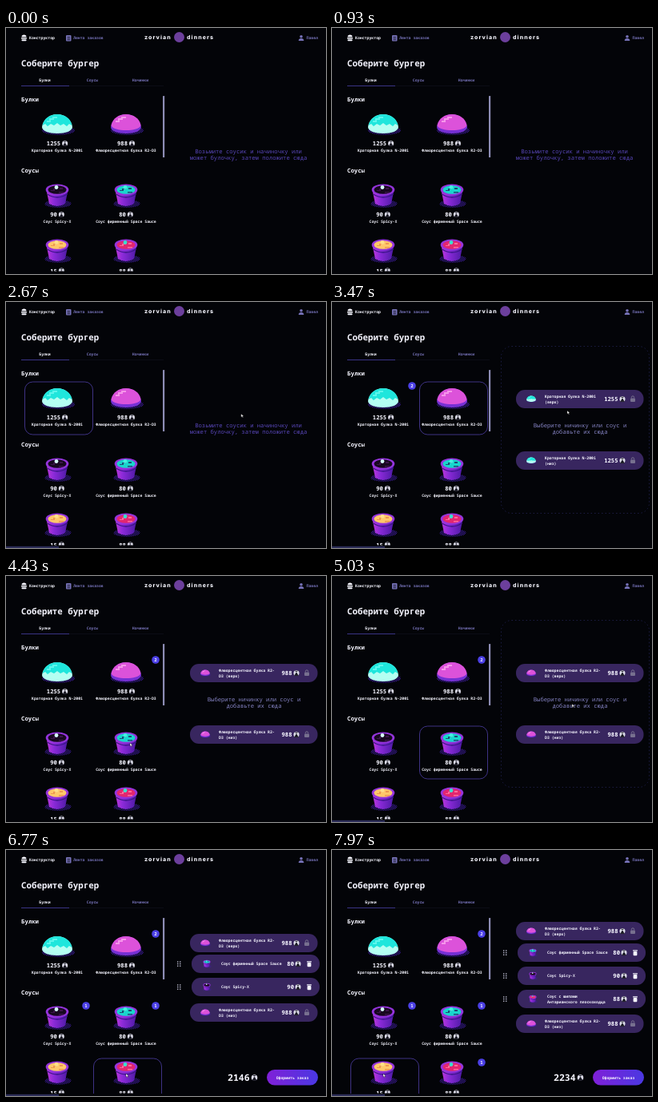
Write an HTML page that moves like this. It is 400 by 308 pixels and loops after 8000 ms.

```html
<!DOCTYPE html>
<html lang="ru">
<head>
<meta charset="utf-8">
<title>Конструктор бургеров</title>
<style>
  html, body { margin: 0; width: 100%; height: 100%; overflow: hidden; background: #030408; }
  svg { display: block; width: 100vw; height: 100vh; }
  text { font-family: "Noto Sans Mono", "DejaVu Sans Mono", monospace; text-rendering: geometricPrecision; white-space: pre; }
  .brand { font: 800 7px Inter, sans-serif; letter-spacing: 1.1px; fill: #f0f0f8; }
  .timed { opacity: 0; animation: 8s step-end infinite; }
  #cursor { animation: move 8s ease-in-out infinite; }
</style>
</head>
<body>
<svg id="stage" viewBox="0 0 400 308">
  <defs>
    <pattern id="dither" width="2" height="2" patternUnits="userSpaceOnUse">
      <path d="M0 0h1v1h1v1h-1v-1h-1z" fill="#3b1c96"/>
    </pattern>
    <linearGradient id="order"><stop stop-color="#8020d8"/><stop offset="1" stop-color="#4a38e2"/></linearGradient>
    <linearGradient id="pot"><stop stop-color="#c038dc"/><stop offset=".35" stop-color="#8a2ad8"/><stop offset="1" stop-color="#4c1aa4"/></linearGradient>
    <clipPath id="list"><rect width="200" height="304.5"/></clipPath>
  </defs>
</svg>
<script>
const LOOP = 8000;
const WHITE = '#f6f6ff', DIM = '#7672b8', PURPLE = '#4f3fa4', PANEL = '#38265f';
const S = 4.85, M = 7.2, ADVANCE = 0.6;
const rules = [];

const text = (x, y, str, { size = S, fill = WHITE, anchor = 'start', weight = 600 } = {}) =>
  `<text x="${x}" y="${y + size * 0.35}" font-size="${size}" fill="${fill}" text-anchor="${anchor}" font-weight="${weight}">${str}</text>`;
const rect = (x, y, w, h, r, attrs) => `<rect x="${x}" y="${y}" width="${w}" height="${h}" rx="${r}" ${attrs}/>`;
const at = (x, y, body, scale = 1) => `<g transform="translate(${x} ${y}) scale(${scale})">${body}</g>`;
const pct = ms => (ms / LOOP * 100).toFixed(3) + '%';

// Shows the content only inside the given [from, to] spans of the loop.
function during(spans, body) {
  const name = 'show' + rules.length;
  const steps = spans.map(([from, to]) => `${pct(from)}{opacity:1}${pct(to)}{opacity:0}`).join('');
  rules.push(`@keyframes ${name}{0%{opacity:0}${steps}}`);
  return `<g class="timed" style="animation-name:${name}">${body}</g>`;
}

const coin = (x, y, r = 3.5) => at(x, y,
  '<circle r="1" fill="#dcdce8"/><path d="M0-.2L.65 .9H-.65ZM-.5-.8L0-.5 .5-.8" fill="#15151f" stroke="#15151f" stroke-width=".2"/>', r);

function bun({ base, top, lightest, lower }) {
  return `<ellipse cx="1.5" cy="7" rx="20.5" ry="6" fill="url(#dither)"/>
    <path d="M-19 3C-18-6-10-13 0-13S18-6 19 3C19 8 10 11 0 11S-19 8-19 3Z" fill="${base}"/>
    <path d="M-18.5 1C-16.5-8-9-13 0-13S17-8 18.5 1${lower}Z" fill="${top}"/>
    <path d="M-13-5h3v-3h4v-2h6v2h-4v2h-4v3h-5z" fill="${lightest}"/>`;
}
const mintBun = bun({ base: '#b4fff2', top: '#1fe6dc', lightest: '#5cf6ec', lower: 'L15-1 12 2 8-1 4 1 0-2-4 1-8-1-12 2-15-1' });
const pinkBun = bun({ base: '#7630d4', top: '#dc52da', lightest: '#f596ea', lower: 'C17 5 9 7 0 7S-17 5-18.5 1' });

function pot(sauce, spot, dot) {
  return `<ellipse cx="1" cy="10" rx="16.5" ry="5" fill="url(#dither)"/>
    <path d="M-13.5-7L-10 10Q0 16 10 10L13.5-7Z" fill="url(#pot)"/>
    <path d="M-12.5-2Q0 6 12.5-2" fill="none" stroke="#3a1488" stroke-width="1.4"/>
    <ellipse cy="-7.5" rx="14.3" ry="7" fill="#9434dc"/>
    <ellipse cy="-7.5" rx="11.5" ry="5.3" fill="${sauce}"/>
    <path d="M-8-7h3v-2h5v1h-3v2h-5zM2-5h6v1.5h-6zM3-10h4v2h-4z" fill="${spot}"/>
    <circle cx="-1" cy="-10.5" r="2.4" fill="${dot}"/>`;
}
const spicyPot = pot('#17081f', '#3a1448', '#d5fff8');
const spacePot = pot('#18d6cc', '#1d4c78', '#46f0e0');
const yellowPot = pot('#ffc86a', '#ee9850', '#ffe08a');
const pinkPot = pot('#e3266f', '#ff6a9a', '#38e0d0');

function price(cx, y, value) {
  const width = value.length * M * ADVANCE, left = cx - (width + 9) / 2;
  return text(left, y, value, { size: M }) + coin(left + width + 5.5, y);
}
const card = (x, y, art, value, name) =>
  at(x, y, art) + price(x, y + 23.5, value) + text(x, y + 32.5, name, { anchor: 'middle' });
const outline = (x, y) => rect(x - 40.5, y - 21, 85, 66, 10, `fill="none" stroke="${PURPLE}" stroke-width=".8"`);
const badge = (x, y, n) =>
  `<circle cx="${x}" cy="${y}" r="4.8" fill="#4c40e6"/>` + text(x, y, n, { size: 5.6, anchor: 'middle', weight: 700 });

const lines = (x, y, rows) =>
  rows.map((row, i) => text(x, y + (i - (rows.length - 1) / 2) * 7, row)).join('');
const lock = (x, y) =>
  `<path d="M${x - 1.7} ${y - 1}v-1a1.7 1.7 0 0 1 3.4 0v1" fill="none" stroke="#77708f"/>` + rect(x - 3, y - 1, 6, 4.5, 1, 'fill="#77708f"');
const trash = (x, y) =>
  rect(x - 2.4, y - 1.6, 4.8, 5.4, 1, `fill="${WHITE}"`) + rect(x - 3, y - 3.2, 6, 1.2, .5, `fill="${WHITE}"`);
const grip = y => [-2.6, 0, 2.6].map(d => rect(214, y + d - .7, 1.5, 1.5, .4, 'fill="#b8b8cc"') +
  rect(217, y + d - .7, 1.5, 1.5, .4, 'fill="#b8b8cc"')).join('');

const bunRow = (y, { art, rows, cost }, side) =>
  rect(230, y - 11.5, 159.5, 23, 11, `fill="${PANEL}"`) + at(249, y, art, .31) +
  lines(266, y, [rows[0], `${rows[1]}(${side})`]) +
  text(357.5, y, cost, { size: M, anchor: 'end' }) + coin(363, y) + lock(376, y);
const itemRow = (y, { art, rows, cost }) =>
  grip(y) + rect(232, y - 11.5, 160, 23, 11, `fill="${PANEL}"`) + at(251, y, art, .32) +
  lines(269, y, rows) + text(360, y, cost, { size: M, anchor: 'end' }) + coin(365, y) + trash(379, y);

const mint = { art: mintBun, rows: ['Краторная булка N-200i', ''], cost: '1255' };
const pink = { art: pinkBun, rows: ['Флюоресцентная булка R2-', 'D3 '], cost: '988' };
const space = { art: spacePot, rows: ['Соус фирменный Space Sauce'], cost: '80' };
const spicy = { art: spicyPot, rows: ['Соус Spicy-X'], cost: '90' };
const spikes = { art: pinkPot, rows: ['Соус с шипами', 'Антарианского плоскоходца'], cost: '88' };

const hint = (x, rows, fill) => rows.map((row, i) =>
  text(x, 154.5 + i * 8, row, { size: M, fill, anchor: 'middle', weight: 500 })).join('');
const buns = (top, bottom, kind) => bunRow(top, kind, 'верх') + bunRow(bottom, kind, 'низ');
const stack = (top, first, bottom, items) =>
  buns(top, bottom, pink) + items.map((item, i) => itemRow(first + i * 29, item)).join('');
const total = sum => text(277, 285, sum, { size: 11.5 }) + coin(310.5, 285, 3.8);

const LEFT = 64, RIGHT = 150, BUNS = 121, ROW1 = 210, ROW2 = 282;
const tab = (x, str, fill) => text(x, 65, str, { fill, anchor: 'middle' });

const header =
  `<path d="M19.5 11.2q0-2.7 3-2.7t3 2.7z" fill="${WHITE}"/>` + rect(19, 12, 7, 1.5, .5, `fill="${WHITE}"`) + rect(19.5, 14.3, 6, 2, .8, `fill="${WHITE}"`) +
  text(29, 12.5, 'Конструктор', { weight: 700 }) +
  rect(75, 9, 6.5, 7.5, 1, `fill="${DIM}"`) + '<path d="M76.5 11.2h3.5M76.5 13h3.5M76.5 14.8h3.5" stroke="#030408" stroke-width=".7"/>' +
  text(84, 12.5, 'Лента заказов', { fill: DIM }) +
  '<text class="brand" x="173" y="14">zorvian</text><text class="brand" x="226" y="14">dinners</text>' +
  '<circle cx="216.5" cy="11.5" r="6.5" fill="#6c3f9c"/>' +
  `<circle cx="369" cy="10.7" r="1.8" fill="${DIM}"/><path d="M365.7 16q0-3 3.3-3t3.3 3z" fill="${DIM}"/>` +
  text(375.5, 12.5, 'Павел', { fill: DIM });

const menu =
  text(19, 44, 'Соберите бургер', { size: 10.8, weight: 700 }) +
  tab(48.5, 'Булки', WHITE) + tab(108, 'Соусы', DIM) + tab(168, 'Начинки', DIM) +
  '<path d="M19 72.5h60" stroke="#403a94" stroke-width=".9"/><path d="M79 72.5h118" stroke="#12121f" stroke-width=".6"/>' +
  text(19, 89.5, 'Булки', { size: 7.3, weight: 700 }) + text(19, 178, 'Соусы', { size: 7.3, weight: 700 }) +
  rect(196, 85, 2.2, 77, .5, 'fill="#8c8cb4"') +
  '<g clip-path="url(#list)">' +
  card(LEFT, BUNS, mintBun, '1255', 'Краторная булка N-200i') +
  card(RIGHT, BUNS, pinkBun, '988', 'Флюоресцентная булка R2-D3') +
  card(LEFT, ROW1, spicyPot, '90', 'Соус Spicy-X') +
  card(RIGHT, ROW1, spacePot, '80', 'Соус фирменный Space Sauce') +
  at(LEFT, ROW2 - 3, yellowPot) + price(LEFT, 304, '15') +
  at(RIGHT, ROW2 - 3, pinkPot) + price(RIGHT, 304, '88') +
  during([[2300, 2750]], outline(LEFT, BUNS)) +
  during([[3120, 3620]], outline(RIGHT, BUNS)) +
  during([[4600, 5080]], outline(RIGHT, ROW1 - 1)) +
  during([[5700, 6150]], outline(LEFT, ROW1 - 1)) +
  during([[6650, 7100]], outline(RIGHT, ROW2)) +
  during([[7850, LOOP]], outline(LEFT, ROW2)) +
  '</g>' +
  during([[2750, 3620]], badge(100, 105, '2')) +
  during([[3620, LOOP]], badge(187, 105, '2')) +
  during([[5080, LOOP]], badge(187, 195, '1')) +
  during([[6150, LOOP]], badge(100, 195, '1')) +
  during([[7100, LOOP]], badge(187, 266, '1'));

const builder =
  during([[0, 2750]], hint(303, ['Возьмите соусик и начиночку или', 'может булочку, затем положите сюда'], '#5a48bc')) +
  during([[3380, 3620], [4900, 5080], [6050, 6150], [7000, 7100]],
    rect(211.5, 55.5, 185, 209, 13, 'fill="none" stroke="#28285c" stroke-width=".7" stroke-dasharray="1.5 3"')) +
  during([[2750, 3620]], buns(121.5, 198.5, mint)) +
  during([[3620, 5080]], buns(121.5, 198.5, pink)) +
  during([[2750, 5080]], hint(310, ['Выберите ничинку или соус и', 'добавьте их сюда'], '#8684c4')) +
  during([[5080, 6150]], stack(121.5, 148, 198.5, [space]) + total('2056')) +
  during([[6150, 7100]], stack(116.5, 142.5, 203.5, [space, spicy]) + total('2146')) +
  during([[7100, LOOP]], stack(101.5, 128.5, 217.5, [space, spicy, spikes]) + total('2234')) +
  during([[5080, LOOP]], rect(326, 275, 64, 19.5, 9.75, 'fill="url(#order)"') +
    text(358, 285, 'Оформить заказ', { anchor: 'middle' }));

const status = during([[2300, 3650], [4600, LOOP]], rect(0, 305.8, 66, 3, 0, 'fill="#2b2c58"'));
const cursor = during([[1400, LOOP]],
  '<g id="cursor"><path d="M0 0V4.2L1.1 3.2 1.9 4.8 2.6 4.4 1.9 2.9H3.2Z" fill="#fff" stroke="#111" stroke-width=".35"/></g>');

const path = [
  [0, 110, 170], [1400, 110, 170], [1800, 67, 122], [2300, 67, 122], [2680, 294, 140], [2780, 294, 140],
  [3080, 150, 121], [3130, 150, 121], [3420, 294, 136], [3640, 294, 136], [4250, 155, 209], [4600, 155, 209],
  [5040, 300, 160], [5120, 300, 160], [5560, 64, 208], [5780, 64, 208], [6120, 300, 165], [6200, 300, 165],
  [6560, 150, 280], [6780, 150, 280], [7080, 300, 175], [7200, 300, 175], [7700, 64, 280], [LOOP, 64, 280]
];
rules.push(`@keyframes move{${path.map(([ms, x, y]) => `${pct(ms)}{transform:translate(${x}px,${y}px)}`).join('')}}`);

document.head.appendChild(document.createElement('style')).textContent = rules.join('\n');
document.getElementById('stage').insertAdjacentHTML('beforeend', header + menu + builder + status + cursor);
</script>
</body>
</html>
```
